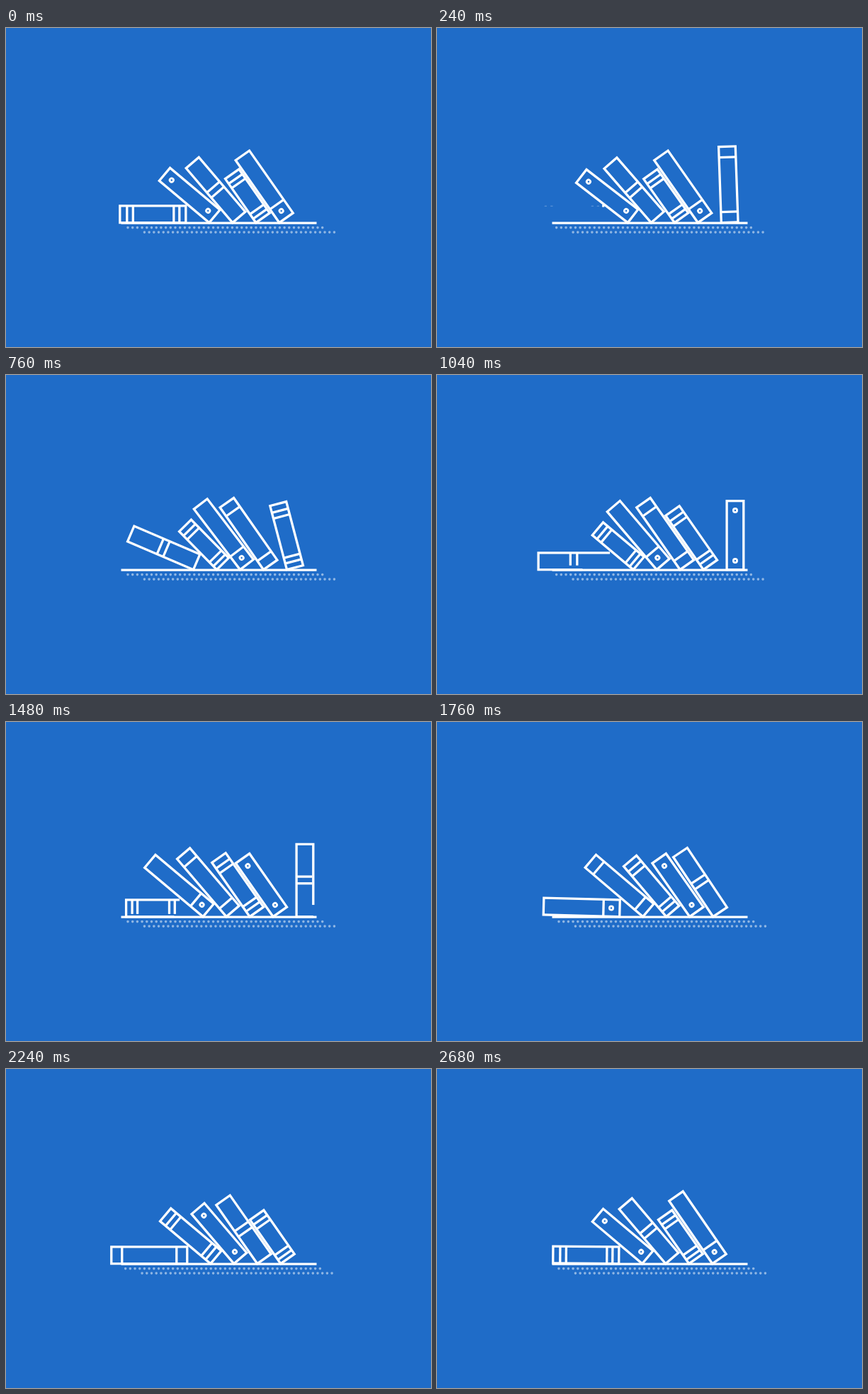
An HTML page with a canvas that plays this animation: 600x450 px, repeating every 2720 ms.

```html
<!DOCTYPE html>
<html lang="en">
<head>
<meta charset="utf-8">
<title>Bookshelf loader</title>
<style>
  html, body { margin: 0; height: 100%; overflow: hidden; background: #1f6cc8; }
  canvas { display: block; }
</style>
</head>
<body>
<canvas id="stage" width="600" height="450"></canvas>
<script>
const ctx = document.getElementById('stage').getContext('2d');
const LOOP = 2720, BEAT = LOOP / 6;
const WIDTH = 23.7, FLOOR = 274.6, ENTRY = 418.9, STEP = 33;
const DOT_GAP = 6.7;
const LEAN = [0, 35, 35, 40.5, 50, 90, 90];

// Stripe and ring positions are distances from the foot of the book.
const BOOKS = [
  { length: 107, stripes: [15, 92], rings: [] },
  { length: 93, stripes: [9, 17, 74.5, 83], rings: [] },
  { length: 92, stripes: [], rings: [12, 79.2] },
  { length: 101, stripes: [46.3, 55.8], rings: [] },
  { length: 75.5, stripes: [6.8, 14.6, 59.5, 67], rings: [] },
  { length: 107.5, stripes: [23], rings: [12] }
];

const clamp = v => Math.min(1, Math.max(0, v));
const progress = (v, from, to) => clamp((v - from) / (to - from));
const ease = p => p < .5 ? 2 * p * p : 1 - 2 * (1 - p) ** 2;

function strokeTrimmed(path, length, from, to) {
  const whole = from === 0 && to === 1;
  ctx.setLineDash(whole ? [] : [(to - from) * length, length * 2]);
  ctx.lineDashOffset = -from * length;
  ctx.stroke(path);
}

function drawBook(book, age) {
  const drawn = progress(age, 8, 129);
  const erased = progress(age, 5 * BEAT + 98, 5 * BEAT + 243);
  if (drawn === 0 || erased === 1) return;

  const slot = Math.min(5, Math.floor(age / BEAT));
  const turn = ease(progress(age - slot * BEAT, 202, 432));
  const lean = LEAN[slot] + (LEAN[slot + 1] - LEAN[slot]) * turn;
  const stretch = 1 + .06 * (progress(age, 117, 136) - ease(progress(age, 155, 210)));
  const height = book.length * stretch;

  ctx.save();
  ctx.translate(ENTRY - STEP * age / BEAT, FLOOR);
  ctx.rotate(-lean * Math.PI / 180);
  ctx.strokeStyle = '#fff';
  ctx.lineWidth = 3.3;

  const cover = new Path2D(`M${WIDTH} 0H0V${-height}H${WIDTH}Z`);
  strokeTrimmed(cover, 2 * (WIDTH + height), erased, drawn);
  for (const y of book.stripes)
    strokeTrimmed(new Path2D(`M0 ${-y * stretch}H${WIDTH}`), WIDTH, erased, drawn);

  const radius = 2.6;
  ctx.lineWidth = 2.8;
  for (const y of book.rings) {
    const ring = new Path2D();
    ring.arc(WIDTH / 2, -y * stretch, radius, 0, 2 * Math.PI);
    strokeTrimmed(ring, 2 * Math.PI * radius, erased, drawn);
  }
  ctx.restore();
}

function drawDots(x, y, count) {
  ctx.beginPath();
  for (let i = 0; i < count; i++) {
    const cx = x + i * DOT_GAP;
    ctx.moveTo(cx + 1.8, y);
    ctx.arc(cx, y, 1.8, 0, 2 * Math.PI);
  }
  ctx.fill();
}

function drawShelf(time) {
  ctx.fillStyle = '#fff';
  ctx.fillRect(162.5, 273.5, 276, 3.2);
  const beat = Math.floor(time / BEAT);
  const slide = ease(progress(time - beat * BEAT, 0, 115));
  const shift = -DOT_GAP / 2 * (beat % 2 ? 1 - slide : slide);
  ctx.fillStyle = 'rgba(255,255,255,.5)';
  drawDots(172 + shift, 281.6, 42);
  drawDots(172 + 3.5 * DOT_GAP + shift, 288.1, 41);
}

function render() {
  const time = performance.now() % LOOP;
  ctx.fillStyle = '#1f6cc8';
  ctx.fillRect(0, 0, 600, 450);
  drawShelf(time);
  BOOKS.forEach((book, i) => drawBook(book, (time - i * BEAT + LOOP) % LOOP));
  requestAnimationFrame(render);
}
render();
</script>
</body>
</html>
```
